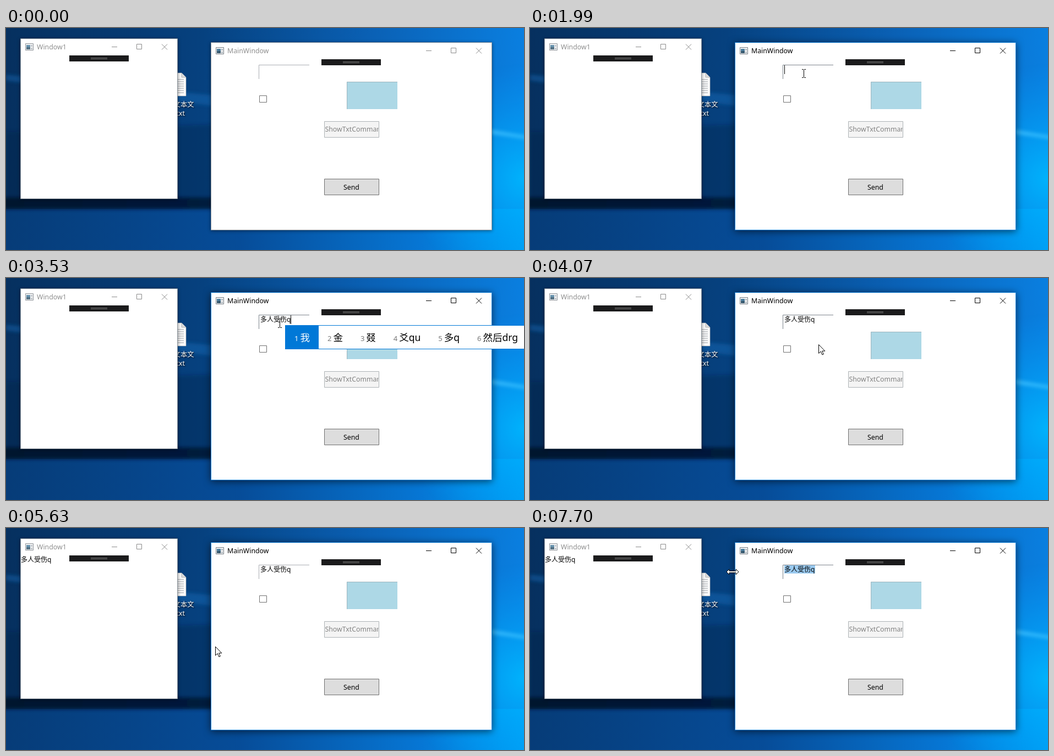
These frames come from a looping animation (941x405 px, 8 s). An HTML page:

```html
<!DOCTYPE html>
<html lang="zh-CN">
<head>
<meta charset="utf-8">
<style>
html, body { margin: 0; width: 100%; height: 100%; overflow: hidden; background: #063a78; }
svg { display: block; width: 100%; height: 100%; }
text { font: 12.3px "Noto Sans", "Noto Sans CJK SC", "Noto Sans CJK", sans-serif; white-space: pre; }
.frame { fill: #fff; stroke: #8f979f; filter: drop-shadow(0 1px 3px #0007); }
.title { fill: #8f8f8f; }
.ctl { fill: none; stroke: #8a8a8a; }
.active .frame { stroke: #1883d7; filter: drop-shadow(0 2px 7px #0009); }
.active .title { fill: #000; }
.active .ctl { stroke: #000; }
#field { fill: none; stroke: #abadb3; }
#field.on { stroke: #7d858d; }
#send { fill: #ddd; stroke: #707070; }
#send.hover { fill: #bee6fd; stroke: #3c7fb1; }
#send.press { fill: #c4e5f6; stroke: #2c628b; }
#typed, #echo { font-size: 12px; }
#list { font-size: 17.5px; }
#list .n { font-size: 13px; fill: #777; }
#list .pick { fill: #fff; }
</style>
</head>
<body>
<svg viewBox="0 0 941 405">
  <defs>
    <linearGradient id="sky">
      <stop offset="0" stop-color="#06305f"/><stop offset=".38" stop-color="#06417f"/>
      <stop offset=".7" stop-color="#0a60b4"/><stop offset="1" stop-color="#0a7fe0"/>
    </linearGradient>
    <linearGradient id="floor">
      <stop offset="0" stop-color="#063c78"/><stop offset=".45" stop-color="#064c98"/>
      <stop offset=".8" stop-color="#0676d4"/><stop offset="1" stop-color="#009cf2"/>
    </linearGradient>
    <linearGradient id="dusk">
      <stop offset="0" stop-color="#03142e"/><stop offset=".5" stop-color="#041c40"/>
      <stop offset=".9" stop-color="#04285a" stop-opacity="0"/>
    </linearGradient>
    <radialGradient id="glow" gradientUnits="userSpaceOnUse" cx="941" cy="275" r="210">
      <stop stop-color="#00b8ff" stop-opacity=".9"/><stop offset="1" stop-color="#00a0ff" stop-opacity="0"/>
    </radialGradient>
    <filter id="soft"><feGaussianBlur stdDeviation="3"/></filter>
    <g id="icon">
      <path d="M.5.5h14v12H.5z" fill="#f5f5f5" stroke="#777d84"/>
      <path d="M2 3h7v8H2z" fill="#4d7f9f"/><path d="M2 7h7v4H2z" fill="#35576d"/>
      <path d="M10 3h3v3h-3zM10 8h3v3h-3z" fill="#b4bcc3"/>
    </g>
    <path id="buttons" d="M0 .5h10M45.500-4.500h9v9h-9zM91-4.500l10 10M101-4.500l-10 10"/>
    <g id="tools">
      <path d="M0 0h108v11H0z" fill="#1b1b1c"/><path d="M39 4.500h30M39 6.500h30" stroke="#6a6a6a"/>
    </g>
  </defs>

  <path d="M0 0h941v405H0z" fill="url(#sky)"/>
  <path d="M0 330h941v75H0z" fill="url(#floor)"/>
  <g filter="url(#soft)">
    <path d="M0 85L400 125V145L0 96z" fill="#1673c0" opacity=".4"/>
    <path d="M0 190L400 175V310H0z" fill="#021d44" opacity=".3"/>
    <path d="M-9 309h959v21H-9z" fill="url(#dusk)"/>
    <path d="M860 182L950 197V204L860 190z" fill="#7fd4ff" opacity=".75"/>
  </g>
  <path d="M700 0h241v405H700z" fill="url(#glow)"/>

  <path d="M294 82h25l8 8v34h-33z" fill="#fafafa" stroke="#b8b8b8" stroke-width=".6"/>
  <path d="M319 82v8h8" fill="#ddd" stroke="#999" stroke-width=".7"/>
  <path d="M298 94h25m-25 4h25m-25 4h25m-25 4h25m-25 4h25m-25 4h25m-25 4h25" stroke="#9a9fa5"/>
  <g fill="#fff" text-anchor="end" style="filter:drop-shadow(1px 1px 1px #000)">
    <text x="341.500" y="143.500">新建文本文</text><text x="325" y="160">档.txt</text>
  </g>

  <g>
    <path class="frame" d="M26.500 19.500h285v292h-285z"/>
    <use href="#icon" x="35" y="28" opacity=".85"/>
    <text class="title" x="56" y="39">Window1</text>
    <use href="#buttons" class="ctl" x="192" y="34"/>
    <use href="#tools" x="115" y="50"/>
    <text id="echo" x="27" y="62">多人受伤q</text>
  </g>

  <g id="main">
    <path class="frame" d="M372.500 26.500h510v342h-510z"/>
    <use href="#icon" x="381" y="35"/>
    <text class="title" x="402" y="46">MainWindow</text>
    <use href="#buttons" class="ctl" x="763" y="41"/>
    <use href="#tools" x="573" y="57"/>
    <path id="field" d="M459.500 93V67.500H551"/>
    <rect id="mark" y="68" height="15" fill="#99c9ef"/>
    <text id="typed" x="462" y="80"></text>
    <path id="under" stroke="#222"/>
    <rect id="caret" y="68" width="1" height="16"/>
    <path d="M460.500 123.500h13v12h-13z" fill="#fff" stroke="#707070"/>
    <path d="M619 98h92v50h-92z" fill="#add8e6"/>
    <path d="M619.500 148V98.500H711" fill="none" stroke="#9cb4bd"/>
    <path d="M578.500 170.500h99v29h-99z" fill="#f4f4f4" stroke="#adb2b5"/>
    <svg x="579" y="171" width="97.500" height="28"><text x=".5" y="18" fill="#838383">ShowTxtCommand</text></svg>
    <path id="send" d="M578.500 275.500h99v29h-99z"/>
    <text x="613" y="295">Send</text>
  </g>

  <g id="popup">
    <path d="M.5 86.500h500v43H.5z" fill="#fff" stroke="#0078d7"/>
    <path d="M0 86h61v44H0z" fill="#0078d7"/>
    <text id="list" x="17" y="115"></text>
  </g>

  <g id="pointer">
    <path id="arrow" d="M.5.5v16l3.700-3.500 2.700 6 2.400-1-2.600-5.800h5.100z" fill="#fff" stroke="#000"/>
    <path id="beam" d="M-3-7.500h2.500l1 1 1-1H4M.5-6.500v13M-3 7.500h2.500l1-1 1 1H4" fill="none" stroke="#000"/>
    <path id="resize" d="M-11 0l5-5v3.500H6V-5l5 5-5 5V1.500H-6V5z" fill="#fff" stroke="#000"/>
  </g>
</svg>
<script>
const $ = id => document.getElementById(id);
const show = (id, on) => $(id).style.display = on ? '' : 'none';
const within = (t, a, b) => t >= a && t < b;
const last = (list, t) => list.filter(row => row[0] <= t).pop();
const out = u => 1 - (1 - u) ** 2.5;
const smooth = u => u * u * (3 - 2 * u);

// start, end, steps, from, to, downward bulge, easing
const moves = [
  [200, 660, 7, [718, 357], [497, 83], 0, out],
  [3840, 4610, 11, [498, 86], [619, 250], 0, smooth],
  [4700, 4770, 2, [626, 283], [626, 283], 0, smooth],
  [5550, 6160, 9, [507, 277], [59, 63], 0, out],
  [6390, 7090, 10, [66, 66], [530, 82], 42, smooth],
  [7240, 7700, 7, [527, 82], [368, 80], 8, smooth]
];
const typing = [[0, ''], [2140, 'g'], [2370, 'gw'], [2520, '多人受伤q']];
const menus = [
  [0, ''], [2220, '一 王 五 不i 天gd 开始ga'], [2370, ''], [2450, '全 两 来 死gq 平w 不会wf'],
  [2520, '我 金 叕 爻qu 多q 然后drg'], [3610, '']
];
const stops = [462, 474, 486, 498, 510, 517.5];
let menu;

function pointerAt(t) {
  const [a, b, n, p, q, bulge, ease] = last(moves, t) || moves[0];
  const step = Math.min(n - 1, Math.floor((t - a) / (b - a) * (n - 1) + .01));
  const u = ease(Math.max(0, step / (n - 1)));
  const mix = i => p[i] + (q[i] - p[i]) * u;
  return [Math.round(mix(0)), Math.round(mix(1) + 4 * bulge * u * (1 - u))];
}

function drawMenu(words) {
  show('popup', words);
  if (words === menu) return;
  menu = words;
  $('list').innerHTML = words.split(' ').map((w, i) => {
    const pick = i ? '' : ' pick';
    return `<tspan class="n${pick}" dx="${i ? 32 : 0}">${i + 1}</tspan><tspan class="${pick}" dx="3">${w}</tspan>`;
  }).join('');
}

function draw(now) {
  const t = now % 8000;
  const [x, y] = pointerAt(t);
  const dragging = t >= 7240;
  const overField = t >= 200 && x > 459 && x < 551 && y > 67 && y < 93;
  const kind = dragging && x < 374 ? 'resize' : dragging || overField ? 'beam' : 'arrow';
  show('pointer', t >= 200);
  for (const k of ['arrow', 'beam', 'resize']) show(k, k === kind);
  $('pointer').setAttribute('transform', `translate(${x} ${y})`);

  $('main').setAttribute('class', t >= 810 ? 'active' : '');
  $('field').setAttribute('class', overField || within(t, 810, 5000) || dragging ? 'on' : '');
  $('send').setAttribute('class', within(t, 5000, 5170) ? 'press' : within(t, 4700, 5550) ? 'hover' : '');
  show('echo', t >= 5170);

  const text = last(typing, t)[1];
  $('typed').textContent = text;
  const end = Math.floor(462 + (text ? $('typed').getComputedTextLength() : 0));
  $('caret').setAttribute('x', end);
  show('caret', within(t, 900, 1440) || within(t, 1990, 3070) || within(t, 3530, 4070) || within(t, 4610, 5000));
  $('under').setAttribute('d', `M${text.length > 2 ? 510 : 462} 82.5H${end}`);
  show('under', within(t, 2140, 3530));

  const words = last(menus, t)[1];
  drawMenu(words);
  $('popup').setAttribute('transform', `translate(${end - 10} 0)`);

  const left = stops.reduce((a, b) => Math.abs(b - x) < Math.abs(a - x) ? b : a);
  $('mark').setAttribute('x', left);
  $('mark').setAttribute('width', 518 - left);
  show('mark', dragging && left < 517);
  requestAnimationFrame(draw);
}
requestAnimationFrame(draw);
</script>
</body>
</html>
```
